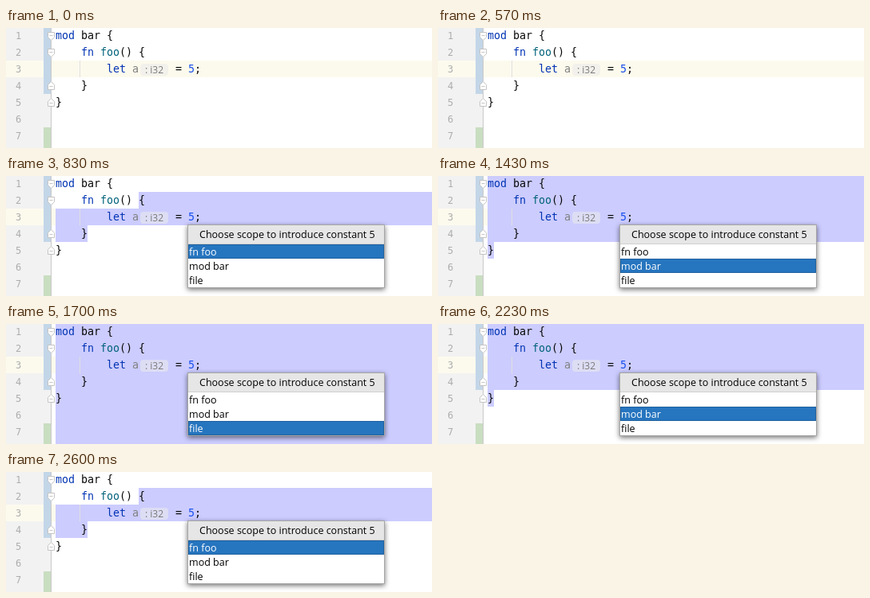
Recreate the animation shown at these times as an HTML page. Size 533x151 px, loop 3.41 s.

```html
<!DOCTYPE html>
<html lang="en">
<head>
<meta charset="utf-8">
<title>Introduce constant</title>
<style>
  html, body { margin: 0; width: 100%; height: 100%; overflow: hidden; background: #fff; }
  svg { display: block; width: 533px; height: 151px; }
  rect, .sel { shape-rendering: crispEdges; }
  .code { font: 13.3px "DejaVu Sans Mono", "Liberation Mono", monospace; fill: #080808; }
  .ui { font: 500 12.5px "Open Sans", "Noto Sans", sans-serif; fill: #000; }
  .hint { font: 12px "Open Sans", "Noto Sans", sans-serif; fill: #7a7a7a; }
  .num { font-size: 12px; fill: #adadad; }
  .key { fill: #0033b3; }
  .fun { fill: #00627a; }
  .unused { fill: #808080; }
  .lit { fill: #1750eb; }
  .fold { fill: #fff; stroke: #c4c4c4; }
  .shadow { filter: drop-shadow(0 2px 3px rgba(0, 0, 0, .55)); }
</style>
</head>
<body>
<svg id="stage" viewBox="0 0 533 151"></svg>
<script>
const LOOP = 3410;
const LEFT = 62, CHAR = 8, LINE = 21, ITEM = 18;

// [start ms, view]; a view is "idle", "caret" or the index of the chosen scope
const STEPS = [
  [0, "idle"], [70, "caret"], [570, "idle"],
  [830, 0], [1430, 1], [1700, 2], [2230, 1], [2600, 0]
];

const SCOPES = [
  { label: "fn foo", area: "M166 20H533V62H102V83H62V41H166Z" },
  { label: "mod bar", area: "M62 0H533V83H70V104H62Z" },
  { label: "file", area: "M62 0H533V151H62Z" }
];

const stage = document.getElementById("stage");

function add(parent, tag, attrs, text) {
  const el = document.createElementNS("http://www.w3.org/2000/svg", tag);
  for (const name in attrs) el.setAttribute(name, attrs[name]);
  if (text) el.textContent = text;
  parent.append(el);
  return el;
}

const box = (parent, x, y, width, height, fill, more) =>
  add(parent, "rect", { x, y, width, height, fill, ...more });

const label = (parent, x, y, cls, text) =>
  add(parent, "text", { x, y, class: cls }, text);

const baseline = row => 14 + LINE * (row - 1);

const code = (row, col, text, cls = "") =>
  label(stage, LEFT + CHAR * col, baseline(row), "code " + cls, text);

// Gutter and current line
box(stage, 0, 0, 533, 151, "#fff");
box(stage, 0, 0, 56, 151, "#f2f2f2");
box(stage, 0, 41, 533, 21, "#fcfaed");
box(stage, 47, 0, 10, 83, "#c3d6e8");
box(stage, 47, 125, 10, 26, "#c9dec1");
box(stage, 56, 0, 1, 151, "#c9c9c9");
for (let row = 1; row <= 7; row++) label(stage, 12, baseline(row), "code num", row);

const selection = add(stage, "path", { class: "sel", fill: "#ccccff" });
box(stage, 92, 41, 1, 21, "#e0e0e0");

// Fold markers: point down where a block opens, up where it ends
for (const [row, dir] of [[1, 1], [2, 1], [4, -1], [5, -1]]) {
  const y = 10 + LINE * (row - 1) + dir / 2;
  add(stage, "path", {
    class: "fold",
    transform: `translate(56.5 ${y}) scale(1 ${dir})`,
    d: "M-4-5H4V1L0 5L-4 1ZM-2-1H2"
  });
}

// Code
code(1, 0, "mod", "key");
code(1, 4, "bar {");
code(2, 4, "fn", "key");
code(2, 7, "foo", "fun");
code(2, 10, "() {");
code(3, 8, "let", "key");
code(3, 12, "a", "unused");
box(stage, 168, 45, 35, 15, "#ebebeb", { rx: 4, "fill-opacity": .55, style: "shape-rendering:auto" });
label(stage, 174, 57, "hint", ": i32");
label(stage, 212, 56, "code", "=");
const caret = box(stage, 227, 43, 8, 17, "#000");
const five = label(stage, 228, 56, "code lit", "5");
label(stage, 236, 56, "code", ";");
code(4, 4, "}");
code(5, 0, "}");

// Scope popup
const popup = add(stage, "g", {});
box(popup, 227, 61, 247, 80, "#a6a6a6", { class: "shadow" });
box(popup, 228, 62, 245, 23, "#e6e6e6");
box(popup, 228, 85, 245, 1, "#d0d0d0");
box(popup, 228, 86, 245, 3 * ITEM, "#fff");
label(popup, 242, 78, "ui", "Choose scope to introduce constant 5");
const bar = add(popup, "g", {});
box(bar, 228, 86, 245, ITEM, "#1f619f");
box(bar, 229, 87, 243, ITEM - 2, "#2675bf");
const items = SCOPES.map((s, i) => label(popup, 229, 100 + ITEM * i, "ui", s.label));

function show(view) {
  const open = typeof view === "number";
  const blink = view === "caret";
  caret.style.display = blink ? "" : "none";
  five.style.fill = blink ? "#fff" : "";
  popup.style.display = open ? "" : "none";
  selection.setAttribute("d", open ? SCOPES[view].area : "");
  if (!open) return;
  bar.setAttribute("transform", `translate(0 ${ITEM * view})`);
  items.forEach((item, i) => { item.style.fill = i === view ? "#fff" : ""; });
}

const start = performance.now();
let current;

function tick() {
  const t = (performance.now() - start) % LOOP;
  const view = STEPS.findLast(step => step[0] <= t)[1];
  if (view !== current) show(current = view);
  requestAnimationFrame(tick);
}
tick();
</script>
</body>
</html>
```
